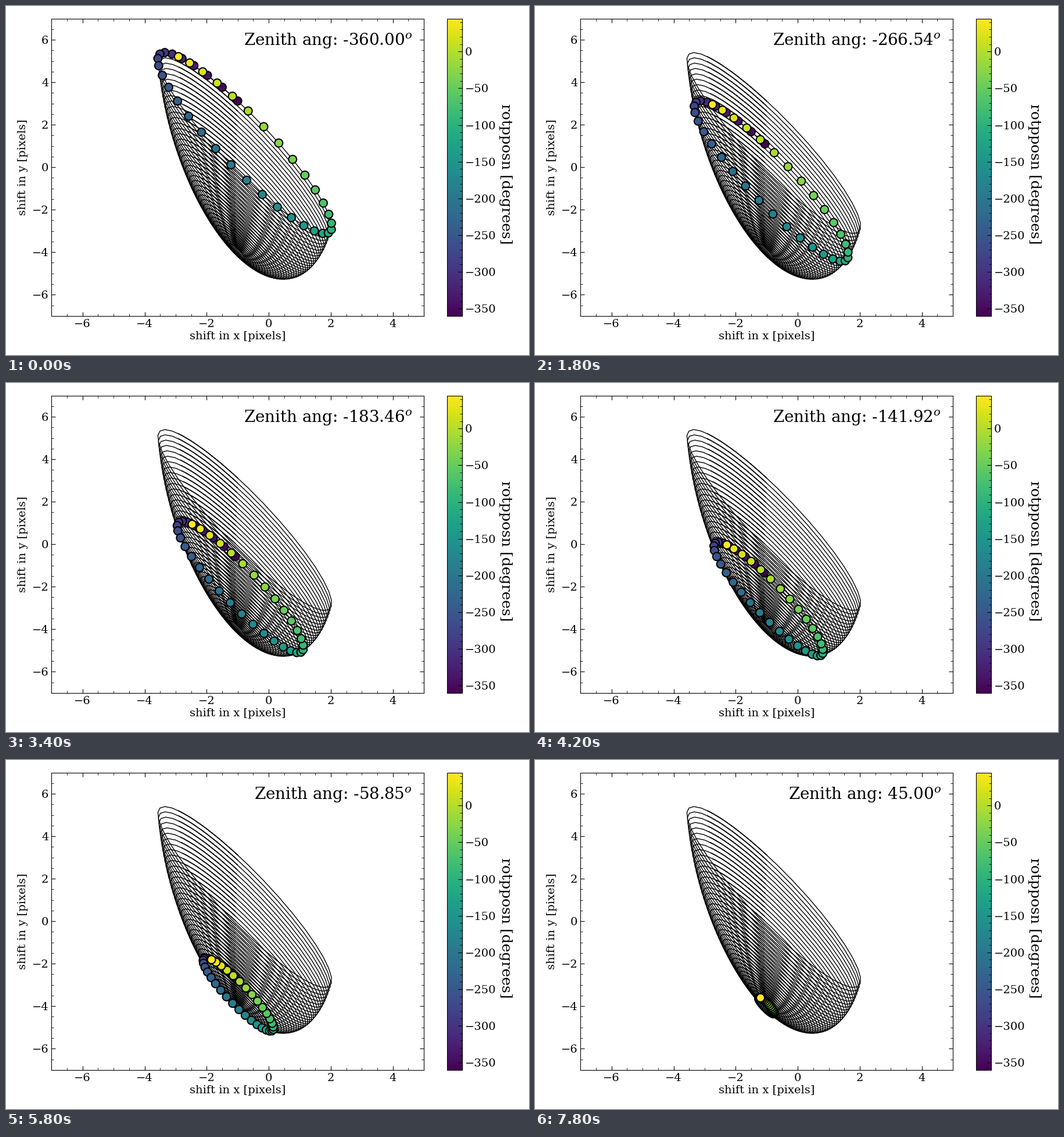
These frames come from a looping animation (900x600 px, 8000 ms). A matplotlib script:

```python
import numpy as np
import matplotlib.pyplot as plt
from matplotlib.animation import FuncAnimation

W, H, DPI = 900, 600, 100
N = 40

plt.rcParams.update({
    "font.family": "DejaVu Serif",
    "mathtext.fontset": "dejavuserif",
    "font.size": 14,
    "xtick.direction": "in", "ytick.direction": "in",
    "xtick.top": True, "ytick.right": True,
    "xtick.minor.visible": True, "ytick.minor.visible": True,
    "xtick.major.size": 5, "ytick.major.size": 5,
    "xtick.minor.size": 3, "ytick.minor.size": 3,
})

rot = np.linspace(-360, 45, N)
elev = np.radians(np.linspace(15, 85, N))


def shift(e):
    """Image shift over all rotator angles at elevation e."""
    x = -0.69 - 0.318 * np.sin(e) - 2.90 * np.cos(e) * np.cos(np.radians(rot - 85.3))
    y = 2.93 - 6.93 * np.sin(e) + 4.41 * np.cos(e) * np.cos(np.radians(rot - 62.3))
    return x, y


def box(left, top, right, bottom):
    """Pixel box, measured from the top left, as figure fractions."""
    return [left / W, 1 - bottom / H, (right - left) / W, (bottom - top) / H]


def label(x, y, text, **kw):
    return fig.text(x / W, 1 - y / H, text, **kw)


fig = plt.figure(figsize=(W / DPI, H / DPI), dpi=DPI, facecolor="white")
ax = fig.add_axes(box(78.3, 21.5, 719.2, 532.8))
ax.set(xlim=(-7, 5), ylim=(-7, 7))

for e in elev:
    ax.plot(*shift(e), color="black", lw=1, zorder=1)

dots = ax.scatter(*shift(elev[0]), c=rot, s=100, cmap="viridis",
                  edgecolors="black", linewidths=1.5, zorder=3)

cax = fig.add_axes(box(759.2, 21.5, 784.7, 532.8))
bar = fig.colorbar(dots, cax=cax)
bar.minorticks_on()

center = dict(ha="center", va="center")
label(398.5, 568, "shift in x [pixels]", **center)
label(29.5, 277, "shift in y [pixels]", rotation=90, **center)
label(859.5, 289, "rotpposn [degrees]", rotation=270, size=18, **center)
title = label(699, 67, "", size=20, ha="right", va="baseline")


def update(i):
    dots.set_offsets(np.column_stack(shift(elev[i])))
    title.set_text(f"Zenith ang: {rot[i]:.2f}$^o$")
    return dots, title


anim = FuncAnimation(fig, update, frames=N, interval=200, repeat=True, repeat_delay=0)
plt.show()
```
